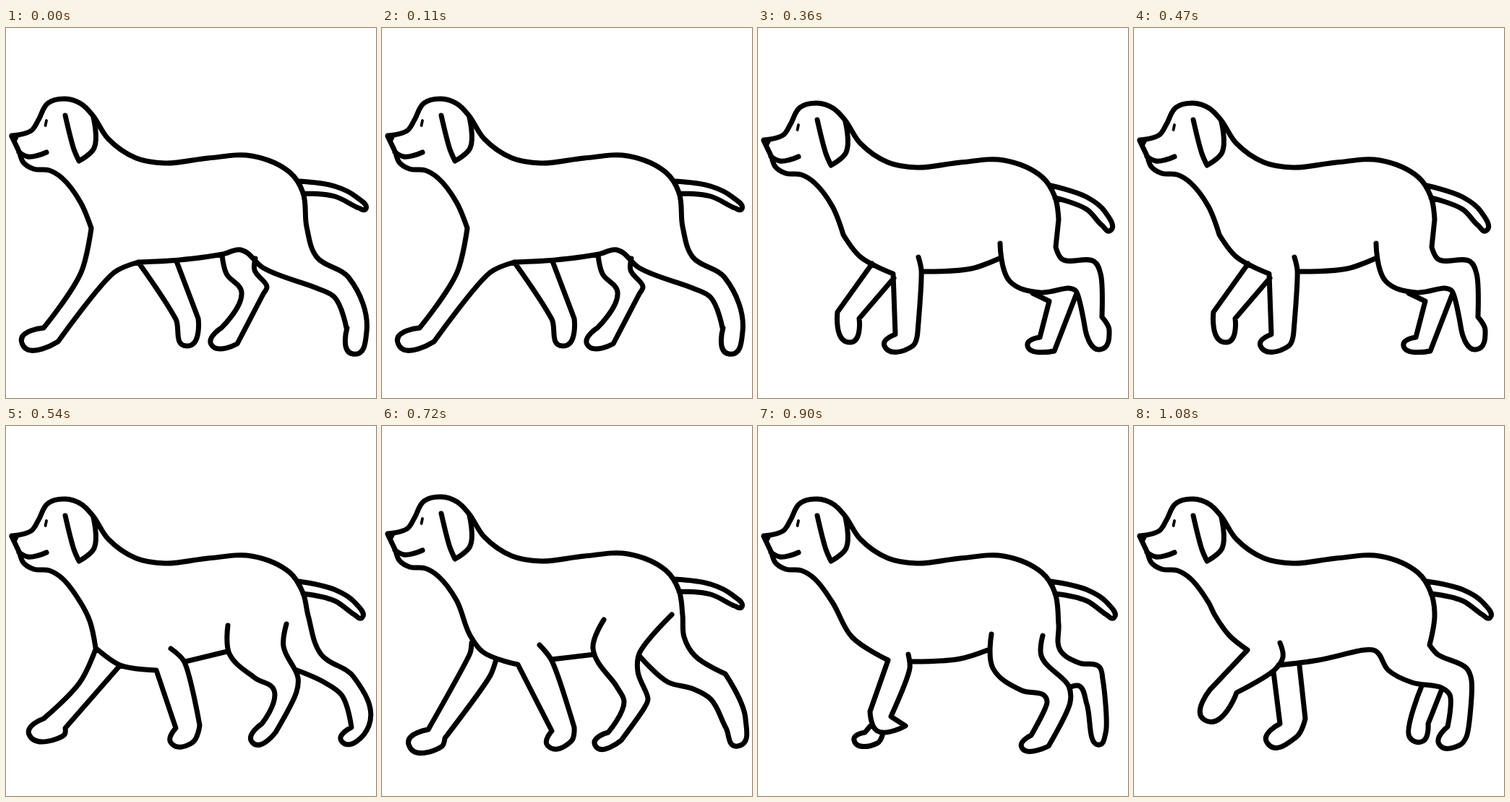
Animation of 512x512 px, one loop 1260 ms. Source, as an HTML page:

```html
<!DOCTYPE html>
<html lang="en">
<head>
<meta charset="utf-8">
<title>Walking dog</title>
<style>
  html, body { margin: 0; width: 100%; height: 100%; overflow: hidden; background: #fff; }
  svg { display: block; width: 100%; height: 100%; }
  path { fill: none; stroke: #000; stroke-width: 7; stroke-linecap: round; stroke-linejoin: round; }
  #nose { fill: #000; stroke-width: 3; }
  #eye { stroke-width: 3.8; }
</style>
</head>
<body>
<svg viewBox="0 0 512 512">
  <g id="head">
    <path id="nose" d="M6 149L18 147L13 157Z"/>
    <path id="eye" d="M56 128L54.500 135"/>
    <path id="face"/>
  </g>
  <path id="body"/>
</svg>
<script>
const STEP = 180;
const $ = id => document.getElementById(id);

// Key points are "x,y"; a trailing "!" makes a sharp corner, "/" starts a new line.
const parse = (text, dy = 0) => text.trim().split(/\s+/).map(word => {
  const [x, y] = word.replace('!', '').split(',').map(Number);
  return { x, y: y + dy, corner: word.endsWith('!') };
});

const ray = (a, b) => {
  const x = b.x - a.x, y = b.y - a.y, length = Math.hypot(x, y) || 1;
  return { x: x / length, y: y / length, length };
};

// Smooth curve: each tangent bisects its two segments, and the handles
// follow a circular arc, kept shorter than the nearest neighbour.
function curve(points) {
  const rays = points.slice(1).map((p, i) => ray(points[i], p));
  const handle = (i, segment, sign) => {
    const p = points[i], before = rays[i - 1], after = rays[i];
    if (!before || !after || p.corner) return `${p.x} ${p.y}`;
    const t = ray({ x: -before.x, y: -before.y }, after);
    const arc = segment.length * 2 / 3 / (1 + t.x * segment.x + t.y * segment.y);
    const h = sign * Math.min(arc, 0.7 * before.length, 0.7 * after.length);
    return `${p.x + t.x * h} ${p.y + t.y * h}`;
  };
  return `M${points[0].x} ${points[0].y}` + rays.map((segment, i) =>
    `C${handle(i, segment, 1)} ${handle(i + 1, segment, -1)} ${points[i + 1].x} ${points[i + 1].y}`).join('');
}
const curves = text => text.split('/').map(line => curve(parse(line))).join('');

const face = '18,172 30,178 45,176 56,172 / 82,121 94,168 101,184! 122,166 121,124';
const chin = '8,150 19,173! 24,186 38,195 60,197 78,208 103,241';
const back = `8,149 35,142 45,127 58,104 82,98 104,105 120,121 142,154 180,180 220,187
  280,180 340,177 393,200 411,228`;

// The tail hangs lower as the body sinks.
const tail = sink => `405,${212 + 3 * sink} 455,${219 + 7.5 * sink} ${485 - 2.5 * sink},${234 + 10 * sink}
  ${498 - 5 * sink},${250 + 15 * sink} ${488 - 6 * sink},${249 + 12 * sink}
  455,${233 + 9 * sink} 411,${229 + 3 * sink}`;

// front continues the chin, rear continues the back, rest holds the other lines.
const poses = [
  { sink: 0,
    front: `118,277! 104,338 52,415! 22,436 72,434! 150,338 183,324! 240,321 300,313 325,307
      356,332 430,360 455,373 471,415`,
    rear: '416,275 430,317 474,345 499,420 480,451 472,415',
    rest: `183,324 235,403 251,440 266,402! 236,323
      / 299,315 305,340 326,366 298,415! 284,438 320,437! 356,368 361,358 344,335 345,319` },
  { sink: 1,
    front: '118,281! 142,305 162,318 156,340 122,412! 97,434 125,444 150,425 185,350 200,315 201,302',
    rear: `416,265 414,288! 424,299 491,340 494,360 504,430 487,450 474,420 460,360 450,354 405,357
      365,340 336,311 318,310 265,323 198,328`,
    rest: `183,358 193,408! 218,432 228,413 220,402! 218,328
      / 308,314 318,343 358,361 364,380 340,423 324,439 365,440! 403,360` },
  { sink: 2,
    front: '118,286! 142,317 187,340! 190,424! 175,440 214,440 221,420! 226,335 222,317',
    rear: `416,265! 412,303! 421,320 465,323 474,340 476,400! 486,418 473,445 453,418!
      440,364 430,360 390,366 348,350 335,298`,
    rest: `158,326 110,393! 127,435 140,402! 188,346 / 228,337 295,333 336,318
      / 380,367 403,378! 390,428! 373,440 410,447! 441,367` },
  { sink: 1,
    front: '116,270 124,307! 158,331 208,338! 235,418! 228,438 258,438 268,414! 246,325 228,308',
    rear: '418,262 436,316 481,347 502,415 465,437 478,417! 465,373 441,355 400,337',
    rest: `124,309 102,355 52,405! 32,427 80,428 82,418! 158,331 / 248,326 306,312
      / 307,276 309,315 345,349 371,366 354,412! 341,438 373,424! 402,368 404,348 384,305 388,274` },
  { sink: 0,
    front: '122,290 140,313 188,330! 235,422! 229,442 262,436 266,417! 234,323 218,303',
    rear: '416,262 418,292 433,318 475,343! 503,405 492,443 476,418 455,378 431,364 395,354 357,319',
    rest: `124,300 122,314 64,420! 37,441 82,444 87,432! 150,345 158,323 / 234,323 294,316
      / 307,268 292,308 325,361 335,382 313,424! 295,442 331,435! 363,390 368,378 354,340 356,315 401,261` },
  { sink: 1,
    front: '130,292 180,324! 155,395! 165,422 204,415! 184,402! 210,335 208,316',
    rear: '416,275 418,310 445,328 472,333 477,350 481,425 470,441 455,385 445,360 433,361',
    rest: `158,412 148,424! 133,435 165,439 173,425 / 211,326 280,322 318,310
      / 323,288 325,335 365,366 395,372 400,382 378,428! 365,445 402,443! 432,382 430,360 392,318 394,290` },
  { sink: 1,
    front: '112,262 132,290 157,310! 105,365! 98,407 142,369! 195,337 206,320 202,300',
    rear: `416,262 409,303! 420,316 460,335 467,352 460,430 450,442 422,440 434,416! 437,372 425,362
      385,355 352,338 334,311 318,310 255,324 200,331`,
    rest: `193,340 202,412! 184,438 225,430 237,405! 229,332
      / 398,360 381,430 400,436 407,412! 426,364` },
].map(({ sink, front, rear, rest }) => ({
  dy: 3 * sink,
  d: curve([...parse(chin, 3 * sink), ...parse(front)]) +
     curve([...parse(back, 3 * sink), ...parse(rear)]) +
     curves(tail(sink)) + curves(rest),
}));

$('face').setAttribute('d', curves(face));

function draw() {
  const pose = poses[Math.floor(performance.now() / STEP) % poses.length];
  $('head').setAttribute('transform', `translate(0 ${pose.dy})`);
  $('body').setAttribute('d', pose.d);
  requestAnimationFrame(draw);
}
draw();
</script>
</body>
</html>
```
